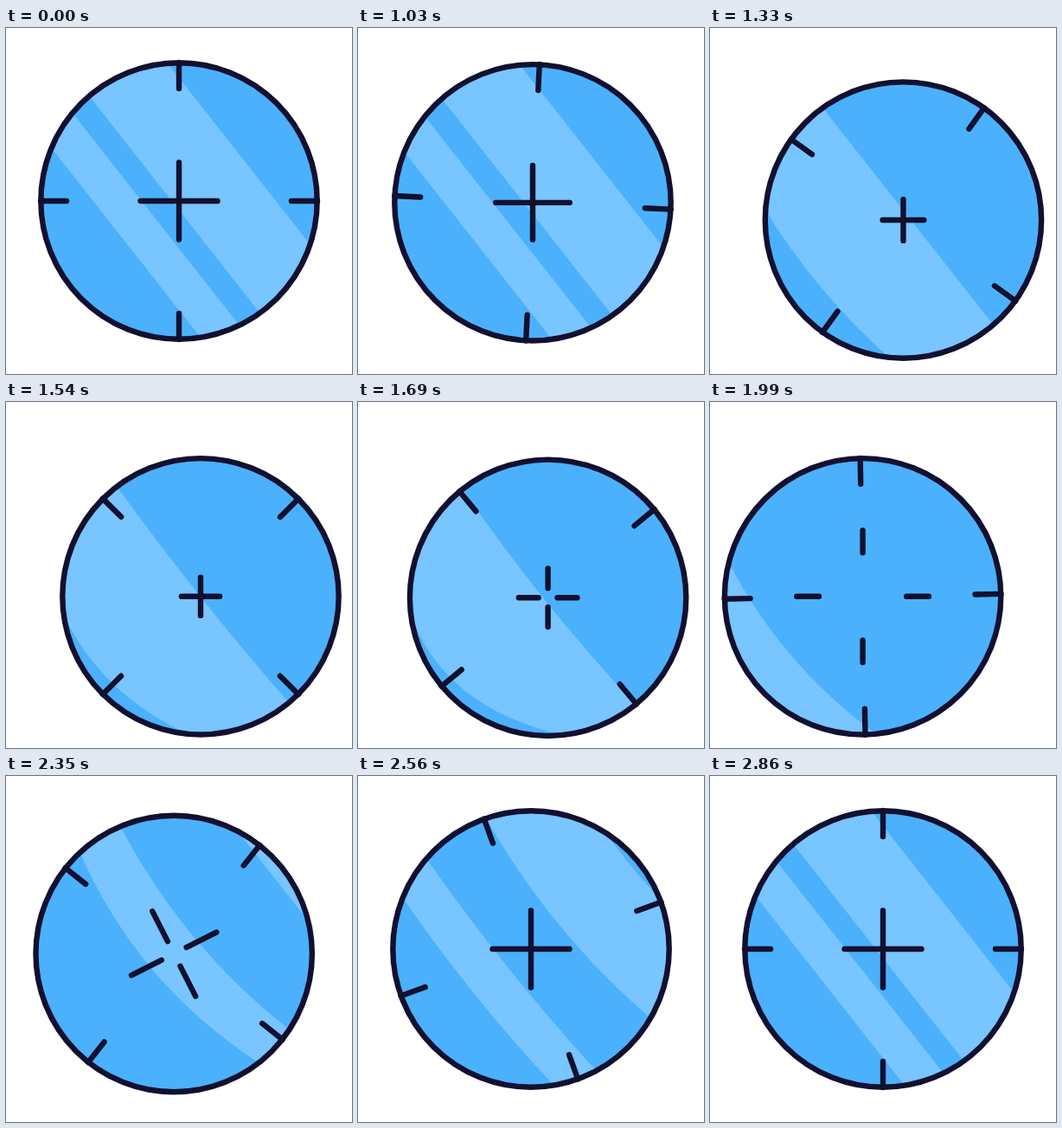
An HTML page with a canvas that plays this animation: 400x400 px, repeating every 2950 ms.

```html
<!DOCTYPE html>
<html lang="en">
<head>
<meta charset="utf-8">
<title>Searching scope</title>
<style>
html, body { margin: 0; width: 100%; height: 100%; overflow: hidden; background: #fff; }
canvas { display: block; }
</style>
</head>
<body>
<canvas id="stage" width="400" height="400"></canvas>
<script>
const ctx = document.getElementById('stage').getContext('2d');
const LOOP = 2950, HOLD = 1000, STEP = 30;
const INK = '#11102f', BLUE = '#4bb1fd', LIGHT = '#78c5ff';
const RADIUS = 159.7, REACH = 160;
const GLARE_ANGLE = 51.8 * Math.PI / 180;

const out = p => p + p * p - p * p * p;
const inOut = p => p < .5 ? 4 * p ** 3 : 1 - 4 * (1 - p) ** 3;
const sine = p => (1 - Math.cos(Math.PI * p)) / 2;
const quadIn = p => p * p;

// Each key is [time, value, easing into it].
function track(t, ...keys) {
  let [t0, v0] = keys[0];
  for (const [t1, v1, ease = sine] of keys) {
    if (t < t1) return t <= t0 ? v0 : v0 + (v1 - v0) * ease((t - t0) / (t1 - t0));
    [t0, v0] = [t1, v1];
  }
  return v0;
}

function line(x1, y1, x2, y2) {
  ctx.beginPath();
  ctx.moveTo(x1, y1);
  ctx.lineTo(x2, y2);
  ctx.stroke();
}

// Draws the same radial stroke in four directions.
function spokes(inner, outer, degrees) {
  ctx.save();
  ctx.rotate(degrees * Math.PI / 180);
  for (let i = 0; i < 4; i++) {
    line(0, -inner, 0, -outer);
    ctx.rotate(Math.PI / 2);
  }
  ctx.restore();
}

// Edges are [offset, bulge] across the glare direction.
function band([a, bendA], [b, bendB]) {
  const tiltA = bendA / 4, tiltB = bendB / 4;
  ctx.beginPath();
  ctx.moveTo(-REACH, -(a - tiltA));
  ctx.quadraticCurveTo(0, -(a - 2 * bendA), REACH, -(a + tiltA));
  ctx.lineTo(REACH, -(b + tiltB));
  ctx.quadraticCurveTo(0, -(b - 2 * bendB), -REACH, -(b - tiltB));
  ctx.fill();
}

function glare(t) {
  ctx.rotate(GLARE_ANGLE);
  ctx.fillStyle = LIGHT;
  if (t < 38) {
    band(
      [track(t, [0, 88], [13, 2], [21, 4], [37.6, -165, quadIn]),
       track(t, [11, 0], [23, 6], [33, 23], [38, 30])],
      [track(t, [0, -6.6], [13, -112], [23, -80], [33, -220]),
       track(t, [2, 0], [11, 17], [23, 66])]);
    band([track(t, [0, -34], [13, -200]), 0], [track(t, [0, -78], [13, -240]), 0]);
  }
  if (t > 34) {
    const late = track(t, [45, 0], [52, 15], [62, 0]);
    band(
      [track(t, [36, 185], [54, -34, out]), track(t, [36, 0], [45, 18], [56, 0])],
      [track(t, [34.5, 165], [53, -78, out]), track(t, [36, 0], [45, 24], [56, 0])]);
    band(
      [track(t, [40, 330], [62, 88, out]), late],
      [track(t, [38, 228], [62, -6.6, out]), late]);
  }
}

function draw(t) {
  const x = track(t, [0, 200], [13.5, 225, out], [17, 225], [36, 175, p => inOut(p * .95) / inOut(.95)], [50.5, 200, out]);
  const arc = Math.sin(Math.PI * Math.min(1, Math.max(0, (t - 15) / 21)));
  const y = 3 * arc + track(t, [0, 200], [13.5, 223.5, out], [36, 223.5], [50.5, 200, out]);
  const turn = track(t, [0, 0], [17, 45, out], [36.5, 90, inOut], [61, 180, out]);
  const inner = track(t, [17.5, 0], [36, 54], [52, 0, out]);
  const outer = track(t, [0, 44.5], [14, 22, out], [17.5, 22], [36, 80], [52, 44.5, out]);
  const crossTurn = track(t, [36, 0], [52, 90, out]);

  ctx.fillStyle = '#fff';
  ctx.fillRect(0, 0, 400, 400);
  ctx.save();
  ctx.translate(x, y);

  const disc = new Path2D();
  disc.arc(0, 0, RADIUS, 0, 2 * Math.PI);
  ctx.fillStyle = BLUE;
  ctx.fill(disc);
  ctx.save();
  ctx.clip(disc);
  glare(t);
  ctx.restore();

  ctx.strokeStyle = INK;
  ctx.lineWidth = 6.4;
  ctx.lineCap = 'round';
  ctx.stroke(disc);
  spokes(130, 160, turn);
  spokes(inner, outer, crossTurn);
  ctx.restore();
}

function frame() {
  const ms = performance.now() % LOOP;
  draw(Math.min(62, Math.max(0, Math.floor((ms - HOLD) / STEP))));
  requestAnimationFrame(frame);
}
frame();
</script>
</body>
</html>
```
